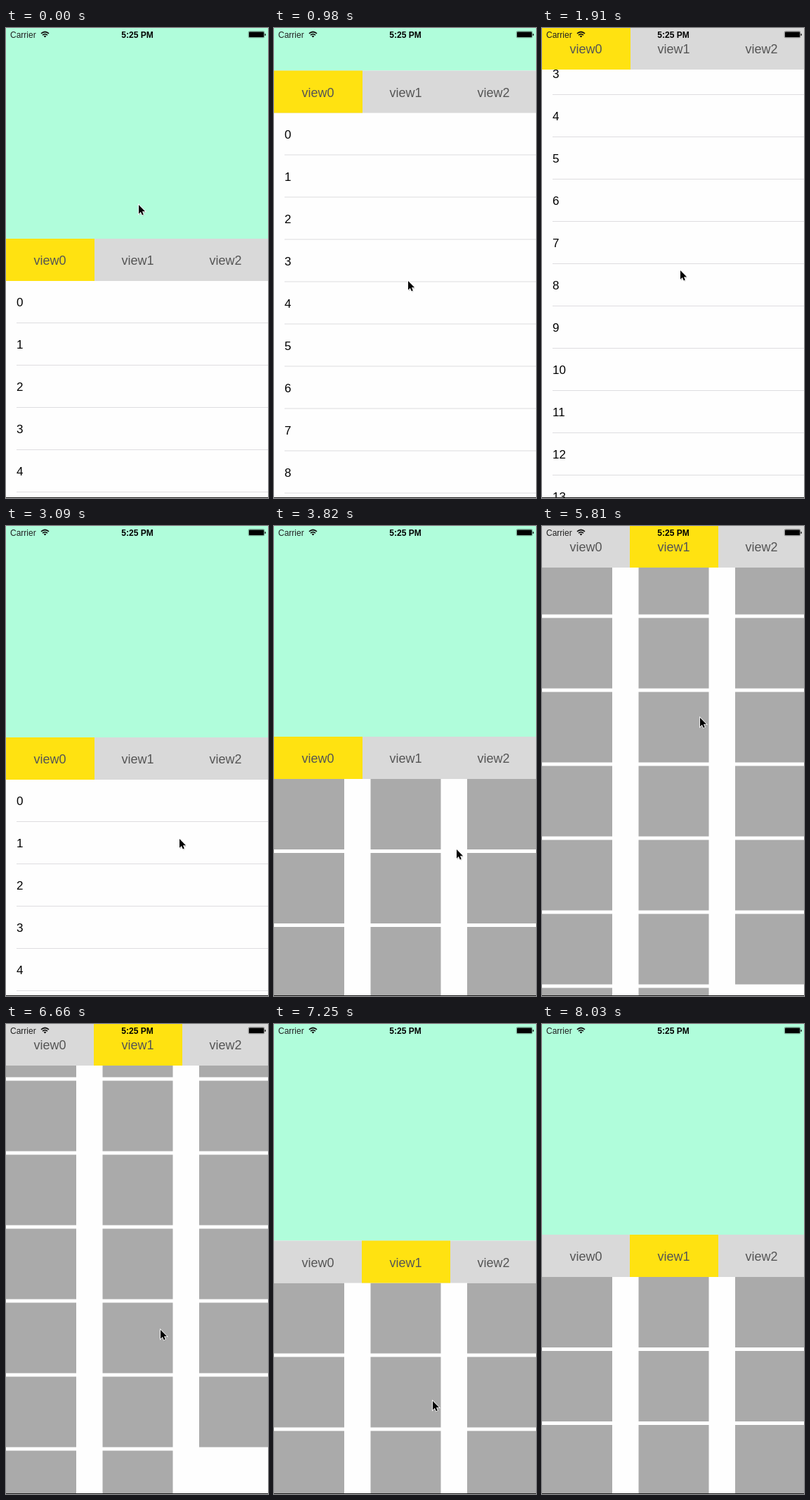
Animation of 373x667 px, one loop 8640 ms. Source, as an HTML page:

```html
<!DOCTYPE html>
<html lang="en">
<head>
<meta charset="utf-8">
<title>Tabbed pages with sticky header</title>
<style>
  html, body { margin: 0; width: 100%; height: 100%; overflow: hidden; background: #fff; }
  svg { display: block; width: 100vw; height: 100vh; font-family: "Liberation Sans", Arial, sans-serif; }
  .row { font-size: 17px; }
  .tab { font-size: 18px; fill: #555; text-anchor: middle; }
  .status { font-size: 12px; }
</style>
</head>
<body>
<svg viewBox="0 0 373 667">
  <rect width="373" height="667" fill="#fefefe"/>
  <g id="pages"></g>
  <rect id="header" width="373" fill="#b0fddb"/>
  <g id="bar">
    <rect width="373" height="60" fill="#d9d9d9"/>
    <rect id="active" width="126" height="60" fill="#ffe211"/>
  </g>
  <g class="status">
    <text x="6" y="14" fill="#222">Carrier</text>
    <g fill="none" stroke="#111" stroke-width="1.7">
      <path d="M50 7.8Q55.5 3.2 61 7.8M52 10.2Q55.5 7.2 59 10.2"/>
      <path d="M53.6 11.4Q55.5 9.9 57.4 11.4L55.5 13.4Z" fill="#111" stroke="none"/>
    </g>
    <text x="187" y="14" text-anchor="middle" font-weight="bold">5:25 PM</text>
    <rect x="345.25" y="4.75" width="22.5" height="9" rx="1.5" fill="none" stroke="#333" stroke-width=".5"/>
    <rect x="346" y="5.5" width="21" height="7.5" rx=".8"/>
    <path d="M368.4 7.8q1.4 0 1.4 1.6t-1.4 1.6z"/>
  </g>
  <rect y="666" width="373" height="1" fill="#1c1c1c"/>
  <g id="cursor">
    <path d="M1 2V17L4.5 13.8 6.8 18.6 9 17.6 6.8 12.8H11.6Z" opacity=".25"/>
    <path d="M0 0V15L3.4 11.8 5.7 17 8 16 5.8 11H10.7Z" stroke="#fff" stroke-width="2" paint-order="stroke"/>
  </g>
</svg>
<script>
const LOOP = 8640, PAGE_W = 375, BAR_Y = 299, BAR_H = 60, TAB_W = 125;
const $ = id => document.getElementById(id);

function add(parent, tag, attrs, text) {
  const node = document.createElementNS("http://www.w3.org/2000/svg", tag);
  for (const key in attrs) node.setAttribute(key, attrs[key]);
  if (text !== undefined) node.textContent = text;
  return parent.appendChild(node);
}

function build() {
  const pages = $("pages"), top = BAR_Y + BAR_H;
  for (let i = 0; i < 20; i++) {
    const y = top + i * 60;
    add(pages, "text", { class: "row", x: 15, y: y + 36 }, i);
    add(pages, "rect", { x: 15, y: y + 59, width: 360, height: 1, fill: "#dedde0" });
    add(pages, "rect", {
      x: PAGE_W + (i % 3) * 137.5, y: top + Math.floor(i / 3) * 105,
      width: 100, height: 100, fill: "#aaa"
    });
  }
  add(pages, "rect", { x: PAGE_W * 2, y: top, width: PAGE_W, height: 1000, fill: "#808080" });
  for (let i = 0; i < 3; i++) {
    add($("bar"), "text", { class: "tab", x: TAB_W * (i + 0.5), y: 37 }, "view" + i);
  }
}

const ramp = (t, from, to) => Math.min(1, Math.max(0, (t - from) / (to - from)));
const flick = (t, from, to) => 1 - (1 - ramp(t, from, to)) ** 3;
const glide = (t, from, to) => (1 - Math.cos(Math.PI * ramp(t, from, to))) / 2;
const bump = (t, from, to) => Math.sin(Math.PI * ramp(t, from, to)) ** 2;

// Fling up to a height, pull back down, then overshoot the top a little.
function visit(t, start, height) {
  const u = t - start;
  return height * (flick(u, 0, 700) - glide(u, 1000, 1650)) - 30 * bump(u, 1600, 2280);
}

// Resting points of the pointer: [time, x, y].
const stops = [
  [30, 189, 251], [330, 188, 262], [840, 190, 450], [1130, 192, 260], [1910, 197, 344],
  [3090, 247, 444], [3820, 260, 459], [4920, 296, 480], [5740, 225, 270],
  [6660, 220, 434], [8030, 235, 690]
];

function pointer(t, axis) {
  return stops.reduce((value, stop, i) => {
    const previous = stops[i - 1];
    return previous ? value + (stop[axis] - previous[axis]) * glide(t, previous[0], stop[0]) : stop[axis];
  }, 0);
}

function move(node, x, y) {
  node.setAttribute("transform", `translate(${x} ${y})`);
}

function draw(t) {
  const scroll = Math.round(2 * (visit(t, 850, 515.2) + visit(t, 5530, 424.5))) / 2;
  const lastPage = flick(t, 4090, 4480) - flick(t, 4720, 5218);
  const page = flick(t, 3280, 3800) + lastPage;
  const tab = (t >= 3930) + (t >= 4510) - (t >= 5260);
  const barY = Math.max(-1, BAR_Y - scroll);

  move($("pages"), -Math.round(page * PAGE_W), -scroll);
  $("header").setAttribute("height", Math.max(0, barY));
  move($("bar"), 0, barY);
  $("active").setAttribute("x", TAB_W * tab);

  const x = pointer(t, 1) - 100 * (lastPage + bump(t, 3200, 3800));
  move($("cursor"), Math.round(x), Math.round(pointer(t, 2)));
  $("cursor").setAttribute("transform", $("cursor").getAttribute("transform") + " scale(.85)");
}

build();
const start = performance.now();
function frame() {
  draw((performance.now() - start) % LOOP);
  requestAnimationFrame(frame);
}
frame();
</script>
</body>
</html>
```
